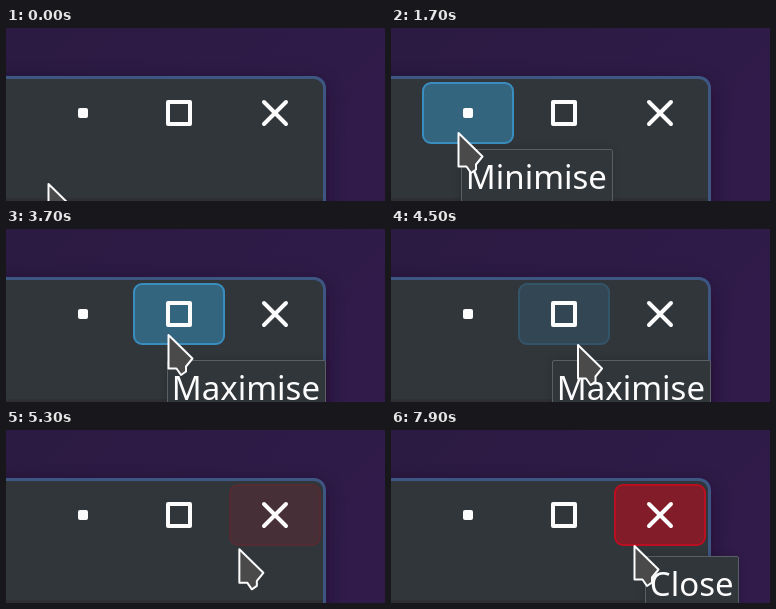
An HTML page that plays this animation: 379x173 px, repeating every 8000 ms.

```html
<!DOCTYPE html>
<html lang="en">
<head>
<meta charset="utf-8">
<title>Window buttons</title>
<style>
html, body { margin: 0; width: 100%; height: 100%; overflow: hidden; background: #2d1a45; }
svg { display: block; width: 379px; height: 173px; }
text { font: 33px "Noto Sans", "Open Sans", sans-serif; fill: #fcfcfc; }
.tip rect { fill: #31363b; stroke: #5a5f64; }
.tip .shade { fill: #000; stroke: none; opacity: 0.15; filter: url(#soft); }
.hover { fill: #34657f; stroke: #3a8dbf; stroke-width: 2; }
.close { fill: #831c29; stroke: #b90f20; }
.icon { fill: none; stroke: #fcfcfc; stroke-width: 4; stroke-linecap: round; stroke-linejoin: round; }
</style>
</head>
<body>
<svg viewBox="0 0 379 173">
  <defs>
    <linearGradient id="sky" x2="1" y2="0.4">
      <stop offset="0" stop-color="#2b1a41"/>
      <stop offset="1" stop-color="#301b4a"/>
    </linearGradient>
    <filter id="blur" x="-20%" y="-30%" width="140%" height="160%">
      <feGaussianBlur stdDeviation="9"/>
    </filter>
    <filter id="soft" x="-30%" y="-30%" width="160%" height="160%">
      <feGaussianBlur stdDeviation="4"/>
    </filter>
  </defs>

  <rect width="379" height="173" fill="url(#sky)"/>
  <rect x="-40" y="54" width="360" height="180" rx="12" fill="#120a1e" opacity="0.5" filter="url(#blur)"/>
  <rect x="-20" y="49.5" width="338.5" height="200" rx="10.5" fill="#31363b" stroke="#3e5682" stroke-width="3"/>
  <rect y="170" width="317" height="3" fill="#2e3034"/>

  <g id="hovers"></g>
  <rect x="72" y="80" width="10" height="10" rx="2" fill="#fcfcfc"/>
  <rect class="icon" x="162" y="74" width="22" height="22"/>
  <path class="icon" d="M258 74l22 22m0-22l-22 22"/>
  <g id="tips"></g>

  <path id="cursor" d="M.5 1L24.5 24.5L18 32.5V37.5L13 41L8.5 34.5H.5Z"
        fill="#4b4a4a" stroke="#fcfcfc" stroke-width="2" stroke-linejoin="round"/>
</svg>
<script>
const LOOP = 8000, STEP = 100;

// hover and tip: fade in from, to, then fade out from, to
const buttons = [
  { label: "Minimise", x: 70, y: 121, width: 151, hover: [500, 800, 1900, 2400], tip: [1400, 1700, 2700, 2820] },
  { label: "Maximise", x: 161, y: 131, width: 158, hover: [2900, 3200, 4200, 4700], tip: [3000, 3300, 4500, 5100] },
  { label: "Close", x: 254, y: 126, width: 93, hover: [5200, 5500], tip: [5900, 6100] }
];

// Cursor moves: start time, end time, destination
const home = { x: 42, y: 155 };
const moves = [
  [200, 900, 67, 104], [1900, 2400, 95, 130],
  [2700, 2800, 147, 126], [2800, 3300, 162, 114], [3600, 3700, 162, 105],
  [4200, 4800, 211, 125], [4800, 5100, 223, 125], [5100, 5600, 251, 106],
  [7500, 7900, 243, 115]
];

function ease(t, from, to) {
  const p = Math.min(1, Math.max(0, (t - from) / (to - from)));
  return p * p * (3 - 2 * p);
}

const fade = (t, [inFrom, inTo, outFrom = LOOP, outTo = LOOP + 1]) =>
  ease(t, inFrom, inTo) - ease(t, outFrom, outTo);

function cursorAt(t) {
  let { x, y } = home;
  for (const [from, to, toX, toY] of moves) {
    const p = ease(t, from, to);
    x += (toX - x) * p;
    y += (toY - y) * p;
  }
  return { x, y };
}

const byId = id => document.getElementById(id);

buttons.forEach(({ label, x, y, width }, i) => {
  byId("hovers").innerHTML +=
    `<rect class="hover ${label.toLowerCase()}" x="${32 + 96 * i}" y="55" width="90" height="60" rx="8"/>`;
  byId("tips").innerHTML +=
    `<g class="tip" transform="translate(${x} ${y})">
      <rect class="shade" width="${width}" height="70"/>
      <rect x="0.5" y="0.5" width="${width}" height="70" rx="1.5"/>
      <text x="4.8" y="40">${label}</text>
    </g>`;
});

function draw() {
  const t = Math.floor(performance.now() % LOOP / STEP) * STEP;
  const { x, y } = cursorAt(t);
  byId("cursor").setAttribute("transform", `translate(${x} ${y})`);
  buttons.forEach(({ hover, tip }, i) => {
    byId("hovers").children[i].style.opacity = fade(t, hover);
    byId("tips").children[i].style.opacity = fade(t, tip);
  });
  requestAnimationFrame(draw);
}
draw();
</script>
</body>
</html>
```
